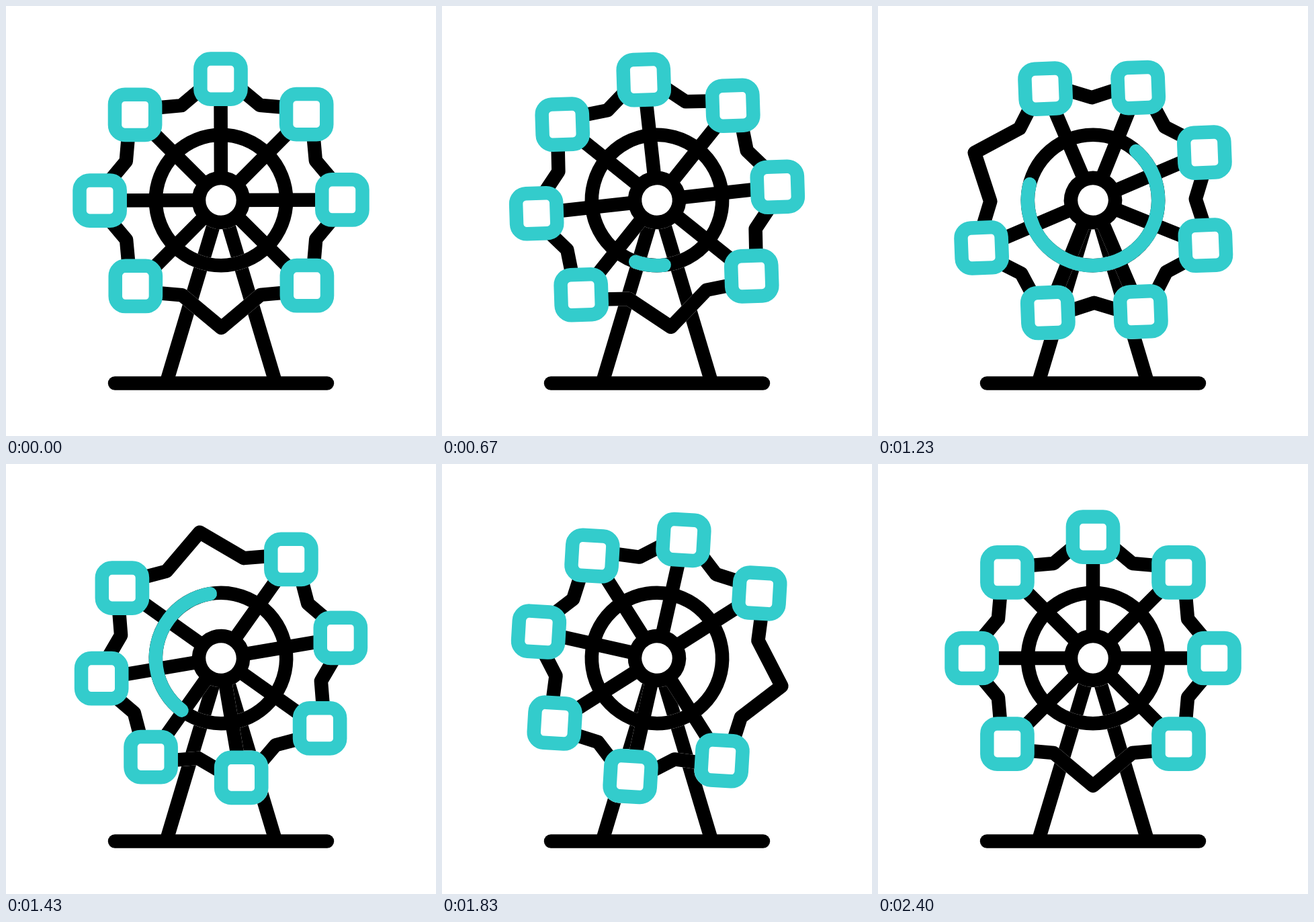
These frames come from a looping animation (640x640 px, 2.5 s). An HTML page with a canvas:

```html
<!DOCTYPE html>
<html lang="en">
<head>
<meta charset="utf-8">
<title>Ferris wheel</title>
<style>
  html, body { margin: 0; width: 100%; height: 100%; overflow: hidden; background: #fff; }
  canvas { display: block; width: 640px; height: 640px; }
</style>
</head>
<body>
<canvas id="stage" width="640" height="640"></canvas>
<script>
const ctx = document.getElementById('stage').getContext('2d');
const TAU = Math.PI * 2, DEG = Math.PI / 180;
const LOOP = 2500, FPS = 30;
const CX = 320, CY = 289, LINE = 20.5;
const RING = 97.2, HUB = 33, ARM = 180.4, CABIN = 60.2;
const BLACK = '#000', WHITE = '#fff', TEAL = '#33cccc';

const progress = (t, from, to) => Math.min(1, Math.max(0, (t - from) / (to - from)));
const smooth = u => u * u * (3 - 2 * u);

// Small wind-up backwards, then one full turn.
function pose(t) {
  const back = progress(t, -33, 495);
  const spin = progress(t, 495, 2386);
  return {
    turn: (375 * smooth(spin) - 15 * smooth(back)) * DEG,
    tilt: -3.5 * Math.sin(spin * TAU) * DEG,
    lead: smooth(progress(t, 544, 1299)) * TAU,
    tail: progress(t, 778, 1604) ** 2 * TAU
  };
}

function line(points, closed) {
  ctx.beginPath();
  points.forEach(([x, y]) => ctx.lineTo(x, y));
  if (closed) ctx.closePath();
  ctx.stroke();
}

function arc(radius, from = 0, to = TAU) {
  ctx.beginPath();
  ctx.arc(0, 0, radius, from, to);
}

// Angles run clockwise from straight down, where the cabin is missing.
const polar = (radius, angle) => [-radius * Math.sin(angle), radius * Math.cos(angle)];

function cabin(x, y, tilt) {
  ctx.save();
  ctx.translate(x, y);
  ctx.rotate(tilt);
  ctx.beginPath();
  ctx.roundRect(-CABIN / 2, -CABIN / 2, CABIN, CABIN, 15);
  ctx.fillStyle = WHITE;
  ctx.fill();
  ctx.strokeStyle = TEAL;
  ctx.stroke();
  ctx.restore();
}

function wheel({ turn, tilt, lead, tail }) {
  ctx.save();
  ctx.translate(CX, CY);
  ctx.rotate(turn);
  ctx.strokeStyle = BLACK;

  const rim = Array.from({ length: 16 }, (_, i) => polar(i % 2 ? 152.7 : 190, i * TAU / 16));
  line(rim, true);

  const seats = Array.from({ length: 7 }, (_, i) => polar(ARM, (i + 1) * TAU / 8));
  seats.forEach(seat => line([[0, 0], seat]));

  arc(RING);
  ctx.stroke();
  if (lead > tail) {
    ctx.strokeStyle = TEAL;
    arc(RING, TAU / 4 + tail, TAU / 4 + lead);
    ctx.stroke();
  }

  ctx.strokeStyle = BLACK;
  ctx.fillStyle = WHITE;
  arc(HUB);
  ctx.fill();
  ctx.stroke();

  seats.forEach(([x, y]) => cabin(x, y, tilt - turn));
  ctx.restore();
}

function stand() {
  ctx.strokeStyle = BLACK;
  line([[239.8, 557], [CX, CY], [400.2, 557]]);
  line([[162, 561.5], [478, 561.5]]);
}

function draw(t) {
  const now = pose(t);
  ctx.clearRect(0, 0, 640, 640);
  ctx.lineWidth = LINE;
  ctx.lineCap = ctx.lineJoin = 'round';
  stand();
  // Cutting the wheel out of the stand first leaves a hairline between them.
  ctx.globalCompositeOperation = 'destination-out';
  wheel(now);
  ctx.globalCompositeOperation = 'source-over';
  wheel(now);
}

function tick() {
  const t = performance.now() % LOOP;
  draw(Math.floor((t + 4) * FPS / 1000) * 1000 / FPS % LOOP);
  requestAnimationFrame(tick);
}
tick();
</script>
</body>
</html>
```
